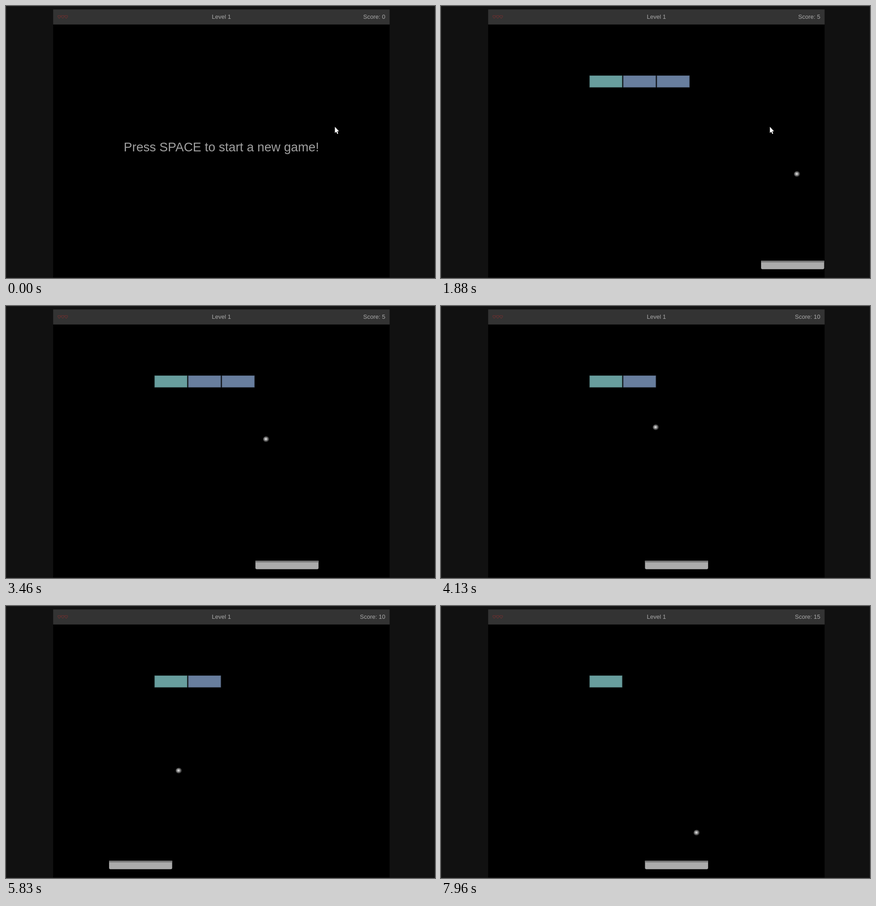
An HTML page with a canvas that plays this animation: 941x595 px, repeating every 8 s.

```html
<!DOCTYPE html>
<html lang="en">
<head>
<meta charset="utf-8">
<title>Brick game</title>
<style>
  html, body { margin: 0; width: 100%; height: 100%; overflow: hidden; background: #111; }
  canvas { display: block; width: 941px; height: 595px; }
</style>
</head>
<body>
<canvas id="stage"></canvas>
<script>
const W = 941, H = 595, LOOP = 8000;
const SHOW = 830;                   // title gives way to the game
const HIDE_CURSOR = 3000;
const FIELD = { x: 103.4, y: 41, w: 738 };
const MIDDLE = FIELD.x + FIELD.w / 2;
const CELL = FIELD.w / 10;          // brick grid column
const FONT = '"Liberation Sans", Arial, sans-serif';

// Ball: constant vertical speed between the brick row and the paddle
const LAUNCH = 770, SPEED = 0.279;  // ms, px per ms
const FROM = { x: 471.5, y: 312 };
const TOP = 185, DROP = 365, WALL = 836;
const STEER = 0.00287;              // sideways speed per px off the paddle centre

// Paddle: key presses as [start, signed number of steps]
const PADDLE_W = 138.4, STEP = FIELD.w * 0.015, TICK = 20;
const PRESSES = [
  [1300, 27], [2400, -1], [2650, -13], [3500, -9], [4480, -15],
  [5040, -7], [5480, 2], [6390, 28], [7300, -4], [7700, -4]
];

const canvas = document.getElementById('stage');
const ctx = canvas.getContext('2d');
const ratio = window.devicePixelRatio || 1;
canvas.width = W * ratio;
canvas.height = H * ratio;
ctx.scale(ratio, ratio);

const clamp = (v, lo, hi) => Math.min(hi, Math.max(lo, v));

// Vertical distance travelled since the first brick hit
const travelled = t => SPEED * (t - LAUNCH) - (FROM.y - TOP);

const brickHits = t => Math.max(0, Math.floor(travelled(t) / (2 * DROP)) + 1);

function paddleCentre(t) {
  const steps = PRESSES.reduce((sum, [start, n]) =>
    sum + Math.sign(n) * clamp((t - start) / TICK, 0, Math.abs(n)), 0);
  return MIDDLE + steps * STEP;
}

function ballX(t) {
  const bounce = x => x > WALL ? 2 * WALL - x : x;
  let x = FROM.x, vx = SPEED, from = LAUNCH;
  let contact = LAUNCH + (FROM.y - TOP + DROP) / SPEED;
  while (contact <= t) {
    x = bounce(x + vx * (contact - from));
    vx = STEER * (x - paddleCentre(contact));
    from = contact;
    contact += 2 * DROP / SPEED;
  }
  return bounce(x + vx * (t - from));
}

function ballY(t) {
  const round = 2 * DROP;
  const phase = (travelled(t) + round) % round;
  return TOP + DROP - Math.abs(phase - DROP);
}

function rect(x, y, w, h, color) {
  ctx.fillStyle = color;
  ctx.fillRect(x, y, w, h);
}

function text(str, x, y, size, align, color) {
  ctx.font = `${size}px ${FONT}`;
  ctx.textAlign = align;
  ctx.fillStyle = color;
  ctx.fillText(str, x, y);
}

function heart(x, y) {
  ctx.beginPath();
  ctx.moveTo(x, y + 6.6);
  for (const s of [-1, 1]) {
    ctx.moveTo(x, y + 6.6);
    ctx.bezierCurveTo(x + s, y + 5, x + 3.2 * s, y + 3.8, x + 3.2 * s, y + 1.9);
    ctx.bezierCurveTo(x + 3.2 * s, y - 0.4, x + 0.6 * s, y - 0.4, x, y + 1.5);
  }
  ctx.strokeStyle = '#8c2f2f';
  ctx.lineWidth = 0.8;
  ctx.stroke();
}

function drawFrame(score) {
  rect(0, 0, W, H, '#111');
  rect(FIELD.x, FIELD.y - 1, FIELD.w, H, '#000');
  rect(FIELD.x, 7.5, FIELD.w, 33, '#333');
  ctx.strokeStyle = '#1f1f1f';
  ctx.lineWidth = 1;
  ctx.strokeRect(0.5, 0.5, W - 1, H - 1);
  for (let i = 0; i < 3; i++) heart(116.8 + i * 7.6, 20.6);
  text('Level 1', MIDDLE, 28, 13, 'center', '#aaa');
  text('Score: ' + score, 832, 28, 13, 'right', '#aaa');
}

function drawBrick(col) {
  const x = FIELD.x + col * CELL + 0.9;
  const outer = col === 3 || col === 6;
  rect(x, 152, CELL - 1.8, 26.2, outer ? '#689e9e' : '#687e9e');
  ctx.strokeStyle = 'rgba(0,0,0,.25)';
  ctx.lineWidth = 1;
  ctx.strokeRect(x + 0.5, 152.5, CELL - 2.8, 25.2);
}

function drawPaddle(centre) {
  const x = centre - PADDLE_W / 2;
  ctx.beginPath();
  ctx.roundRect(x, 557, PADDLE_W, 18.8, [1, 1, 3, 3]);
  ctx.fillStyle = '#aaa';
  ctx.fill();
  rect(x, 557, PADDLE_W, 3.8, '#777');
}

function drawBall(x, y) {
  ctx.save();
  ctx.translate(x, y);
  const glow = ctx.createRadialGradient(-0.9, -0.5, 0, -0.9, -0.5, 7.8);
  glow.addColorStop(0, '#f4f4f4');
  glow.addColorStop(1, '#000');
  ctx.scale(1, 0.92);
  ctx.beginPath();
  ctx.arc(0, 0, 7.2, 0, Math.PI * 2);
  ctx.fillStyle = glow;
  ctx.fill();
  ctx.restore();
}

function drawCursor(x, y) {
  const shape = [[0, 0], [0, 13.4], [3.1, 10.7], [5.2, 15.6], [7.3, 14.7], [5.2, 9.9], [9, 9.6]];
  ctx.beginPath();
  for (const [dx, dy] of shape) ctx.lineTo(x + dx, y + dy);
  ctx.closePath();
  ctx.fillStyle = '#fff';
  ctx.fill();
}

function draw(t) {
  const hits = brickHits(t);
  drawFrame(hits * 5);
  if (t < SHOW) {
    text('Press SPACE to start a new game!', MIDDLE, 317.6, FIELD.w * 0.0375, 'center', '#a0a0a0');
  } else {
    for (let col = 3; col <= 6 - hits; col++) drawBrick(col);
    drawPaddle(paddleCentre(t));
    drawBall(ballX(t), ballY(t));
  }
  if (t < HIDE_CURSOR) drawCursor(721.4, 264.3);
}

let origin;
function loop(now) {
  origin ??= now;
  draw(Math.max(0, now - origin) % LOOP);
  requestAnimationFrame(loop);
}
requestAnimationFrame(loop);
</script>
</body>
</html>
```
